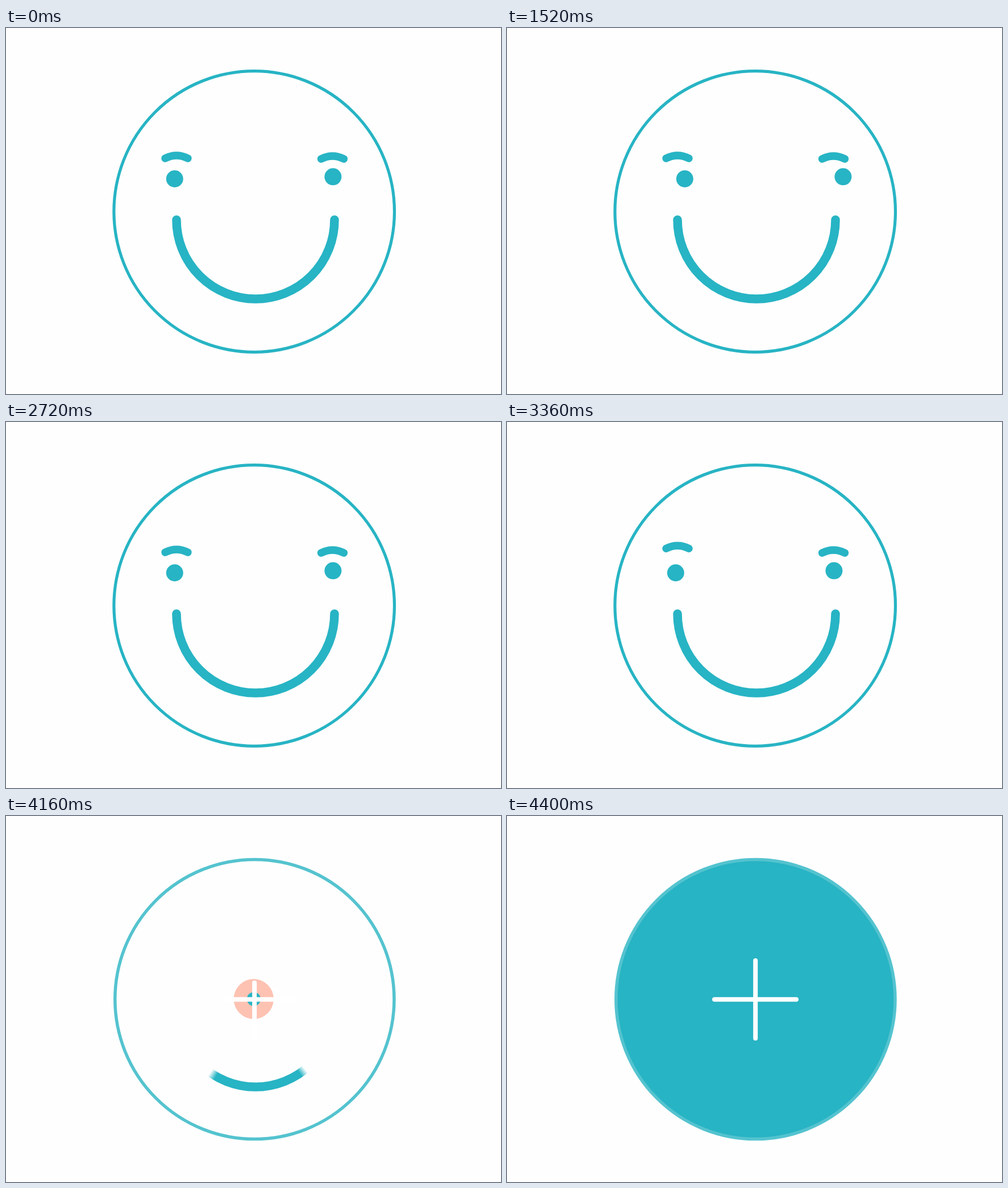
An HTML page with a canvas for the animation above (9.2 s loop, 871 px wide and 643 px high).

```html
<!DOCTYPE html>
<html lang="en">
<head>
<meta charset="utf-8">
<title>Smile to plus</title>
<style>
  html, body { margin: 0; width: 100%; height: 100%; overflow: hidden; background: #fefefe; }
  canvas { display: block; }
</style>
</head>
<body>
<canvas id="stage" width="871" height="643"></canvas>
<script>
const ctx = document.getElementById('stage').getContext('2d');
const LOOP = 9200, STEP = 80;
const TEAL = '#27b4c4', LIGHT = '#54c3cf', PEACH = '#fec2b2', GHOST = '#c6cac6', PAPER = '#fefefe';
const MOUTH = { x: 439, y: 337, r: 139 };
const lerp = (a, b, p) => a + (b - a) * p;

// Progress of a move whose first visible step lands at `start`.
const tween = (t, start, steps) =>
  Math.min(1, Math.max(0, (t - start) / STEP + 1) / steps);

function disc(x, y, r, color) {
  ctx.fillStyle = color;
  ctx.beginPath();
  ctx.arc(x, y, r, 0, 2 * Math.PI);
  ctx.fill();
}

function stroke(color, width, trace) {
  ctx.strokeStyle = color;
  ctx.lineWidth = width;
  ctx.beginPath();
  trace();
  ctx.stroke();
}

function line(x1, y1, x2, y2) {
  stroke('#fff', 8, () => { ctx.moveTo(x1, y1); ctx.lineTo(x2, y2); });
}

function brow(x, y) {
  stroke(TEAL, 13.5, () => {
    ctx.moveTo(x - 20, y);
    ctx.quadraticCurveTo(x, y - 10, x + 20, y);
  });
}

// Arc that shortens towards its lowest point, with feathered ends.
function mouth(trim) {
  const { x, y, r } = MOUTH;
  let paint = TEAL;
  if (trim > 0) {
    const span = 90 - 27.5 * trim;
    if (span <= 0) return;
    paint = ctx.createConicGradient(0, x, y);
    const stops = [[88 - span - 2, 0], [88 - span + 3, 1], [88 + span - 3, 1], [88 + span + 2, 0]];
    for (const [deg, alpha] of stops)
      paint.addColorStop(Math.max(0, deg / 360), `rgba(39,180,196,${alpha})`);
  }
  stroke(paint, 15.5, () => ctx.arc(x, y, r, 0, Math.PI));
}

function eyes(t) {
  let dx = lerp(0, -20, tween(t, 560, 5));
  dx = lerp(dx, 34, tween(t, 1280, 6));
  dx = lerp(dx, 0, tween(t, 1920, 11));
  const returning = t >= 1920 && t < 2720;
  for (const [x, y] of [[296.8, 265], [575.4, 261.3]]) {
    if (returning) disc(x + dx + 1.5, y, 14.8, GHOST);
    disc(x + dx, y, 15, TEAL);
  }
}

function draw(time) {
  const t = Math.floor((time % LOOP) / STEP) * STEP;
  const change = Math.max(0, (t - 4080) / STEP + 1);
  ctx.fillStyle = PAPER;
  ctx.fillRect(0, 0, 871, 643);
  ctx.lineCap = 'round';

  mouth(change);
  if (change < 2) {
    ctx.globalAlpha = change ? 0.5 : 1;
    const lift = 1 - (1 - tween(t, 3360, 8)) ** 2;
    brow(300, 229 - 28.5 * lift);
    brow(574.5, 230);
    eyes(t);
    ctx.globalAlpha = 1;
  }

  const grow = Math.min(1, Math.max(0, (change - 1) / 4));
  if (grow > 0) {
    disc(435.8, 321.5, 240 * Math.sin(grow * Math.PI / 2) ** 2, PEACH);
    disc(lerp(435.5, 437.4, grow), lerp(321.5, 322, grow), 244 * grow ** 2.17, TEAL);
  }

  if (change) stroke(LIGHT, 5.5, () => ctx.arc(437.4, 322, 245.6, 0, 2 * Math.PI));
  else stroke(TEAL, 5.2, () => ctx.arc(436.7, 322.5, 246.8, 0, 2 * Math.PI));

  if (grow > 0) {
    line(509, 322.2, lerp(509, 365, tween(t, 3840, 6)), 322.2);
    line(437.2, 390.5, 437.2, lerp(390.5, 254, tween(t, 3840, 7)));
  }
}

const begin = performance.now();
function tick() {
  draw(performance.now() - begin);
  requestAnimationFrame(tick);
}
tick();
</script>
</body>
</html>
```
